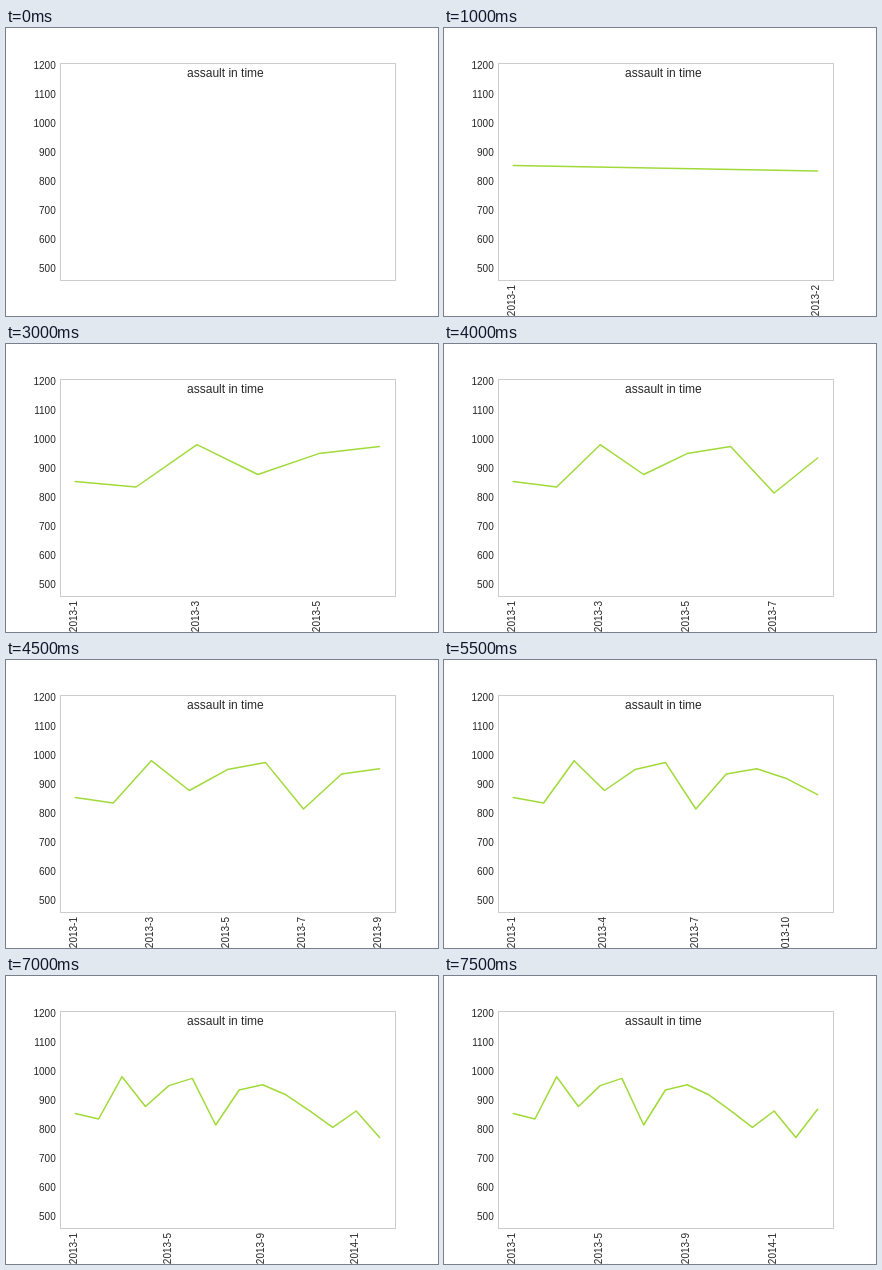
Animation of 432 by 288 pixels, one loop 8000 ms. Source, as an HTML page:

```html
<!DOCTYPE html>
<html lang="en">
<head>
<meta charset="utf-8">
<title>assault in time</title>
<style>
  html, body { margin: 0; width: 100%; height: 100%; overflow: hidden; background: #fff; }
  svg { display: block; }
  text { font: 10px "Liberation Sans", Arial, sans-serif; fill: #262626; }
  .title { font-size: 12px; text-anchor: middle; }
  .tick { text-anchor: end; }
  .frame { fill: none; stroke: #ccc; }
  .line { fill: none; stroke: #a0da39; stroke-width: 1.5; stroke-linecap: round; stroke-linejoin: round; }
</style>
</head>
<body>
<svg width="432" height="288" viewBox="0 0 432 288">
  <polyline id="line" class="line"/>
  <rect class="frame" x="54.5" y="35.5" width="335" height="217"/>
  <text class="title" x="219.4" y="49">assault in time</text>
  <g id="yAxis"></g>
  <g id="xAxis"></g>
</svg>
<script>
  const STEP = 500, COUNT = 16;
  const LEFT = 69.2, SPAN = 304.4;
  // Height on the stage of each month's value, from 2013-1 on
  const heights = [137.5, 143, 100.7, 130.5, 109.6, 102.4, 149, 114, 108.8, 118.8, 134.7, 151.3, 135, 161.5, 133.2];

  const line = document.getElementById('line');
  const xAxis = document.getElementById('xAxis');
  const yAxis = document.getElementById('yAxis');

  function addTick(parent, label, transform) {
    const el = document.createElementNS('http://www.w3.org/2000/svg', 'text');
    el.setAttribute('class', 'tick');
    el.setAttribute('transform', transform);
    el.textContent = label;
    parent.append(el);
  }

  const monthName = i => `${2013 + Math.floor(i / 12)}-${i % 12 + 1}`;
  const xAt = (i, n) => LEFT + SPAN * (n > 1 ? i / (n - 1) : 0.5);

  function draw(n) {
    const points = heights.slice(0, n).map((y, i) => `${xAt(i, n).toFixed(2)},${y}`);
    line.setAttribute('points', n > 1 ? points.join(' ') : '');
    xAxis.replaceChildren();
    // At most four gaps between labels
    const gap = Math.max(1, Math.ceil((n - 1) / 4));
    for (let i = 0; i < n; i += gap) {
      addTick(xAxis, monthName(i), `translate(${Math.round(xAt(i, n) + 1.7)} 257) rotate(-90)`);
    }
  }

  for (let v = 1200; v >= 500; v -= 100) {
    addTick(yAxis, v, `translate(49.7 ${41 + (1200 - v) * 0.29})`);
  }

  let shown = -1;
  const start = performance.now();
  function tick() {
    const n = Math.floor((performance.now() - start) / STEP) % COUNT;
    if (n !== shown) draw(shown = n);
    requestAnimationFrame(tick);
  }
  tick();
</script>
</body>
</html>
```
